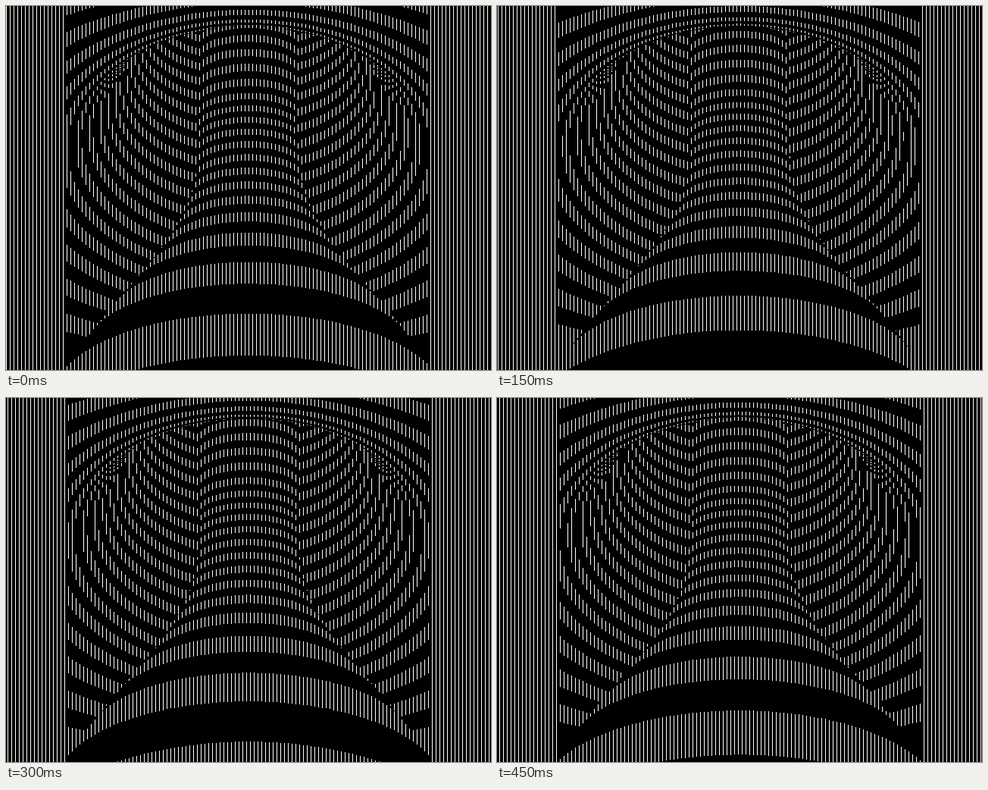
An HTML page with a canvas that plays this animation: 640 by 480 pixels, repeating every 0.6 s.

```html
<!DOCTYPE html>
<html>
<head>
<meta charset="utf-8">
<style>
html, body { margin: 0; width: 100%; height: 100%; overflow: hidden; background: #000; }
canvas { display: block; }
</style>
</head>
<body>
<canvas id="stage" width="640" height="480"></canvas>
<script>
const W = 640, H = 480, SLIT = 5, HOLD = 150, STEP = 0.1;
const SHIFTS = [0, 0.28, 0.56, 0.93];   // stripe travel, in stripe periods
const ctx = document.getElementById('stage').getContext('2d');

// Rings from the nearest to the farthest
function rings(from, to, make) {
  const list = [];
  for (let p = from; p > to; p -= STEP) list.push(make(p));
  return list;
}

// Column: evenly spaced rings that flare towards the viewer
const column = rings(17.4, -2, phase => {
  const top = 37 + 17.5 * phase + 7 * Math.exp(-(((phase - 4) / 2.5) ** 2))
    + 88 * Math.exp(0.85 * (phase - 16));
  const a = 67 + 25.5 * Math.log(1 + Math.exp((top - 238) / 22));
  const bend = 0.0008 + 0.002 / (1 + Math.exp((top - 283) / 32));
  return { phase, top, a, b: 2 * bend * a * a };
});

// Phase on the column, or null beside it
function columnAt(d, y) {
  let last = 1;
  for (const { phase, top, a, b } of column) {
    if (d > 0.97 * a) return null;
    const gap = top + b * (1 - Math.sqrt(1 - (d / a) ** 2)) - y;
    if (gap <= 0) return phase + STEP * gap / (gap - last);
    last = gap;
  }
  return null;
}

// Bowl: widening ellipses; s = 0 touches the rim at its highest point
const bowl = rings(5, -17, s => {
  const bottom = 341 + (s > 0 ? 20 * s + 0.8 * s * s : 25 * s + 0.25 * s * s);
  const b = s > 0 ? (bottom - 27 + 2.75 * s * s) / 2 : 157 * Math.exp(0.07 * s);
  return { phase: s - 2.35, b, c: bottom - b, q: (18.6 - 3.1 * s) * 1e-6 };
});

function bowlAt(d, y) {
  let last = -1;
  for (const { phase, b, c, q } of bowl) {
    const out = d * d * q + ((y - c) / b) ** 2 - 1;
    if (out >= 0) return { phase: phase + STEP * out / (out - last), front: y < c };
    last = out;
  }
  return { phase: 0, front: false };
}

const striped = phase => phase - Math.floor(phase) < 0.5;

function lit(x, y, shift) {
  if (x < 80 || x >= 560) return true;
  const d = Math.abs(x + 0.5 - W / 2);
  const wall = bowlAt(d, y + 0.5);
  const post = wall.front ? null : columnAt(d, y);
  return post === null ? striped(wall.phase - shift) : striped(post + shift);
}

// Each view shows through its own set of slits
const views = SHIFTS.map((shift, slot) => {
  const img = ctx.createImageData(W, H);
  const px = new Uint32Array(img.data.buffer).fill(0xff000000);
  for (let x = slot; x < W; x += SLIT)
    for (let y = 0; y < H; y++)
      if (lit(x, y, shift)) px[y * W + x] = 0xffffffff;
  return img;
});

let start = null;
function draw(now) {
  if (start === null) start = now;
  const step = Math.floor(Math.max(0, now - start) / HOLD) % views.length;
  ctx.putImageData(views[step], 0, 0);
  requestAnimationFrame(draw);
}
ctx.putImageData(views[0], 0, 0);
requestAnimationFrame(draw);
</script>
</body>
</html>
```
